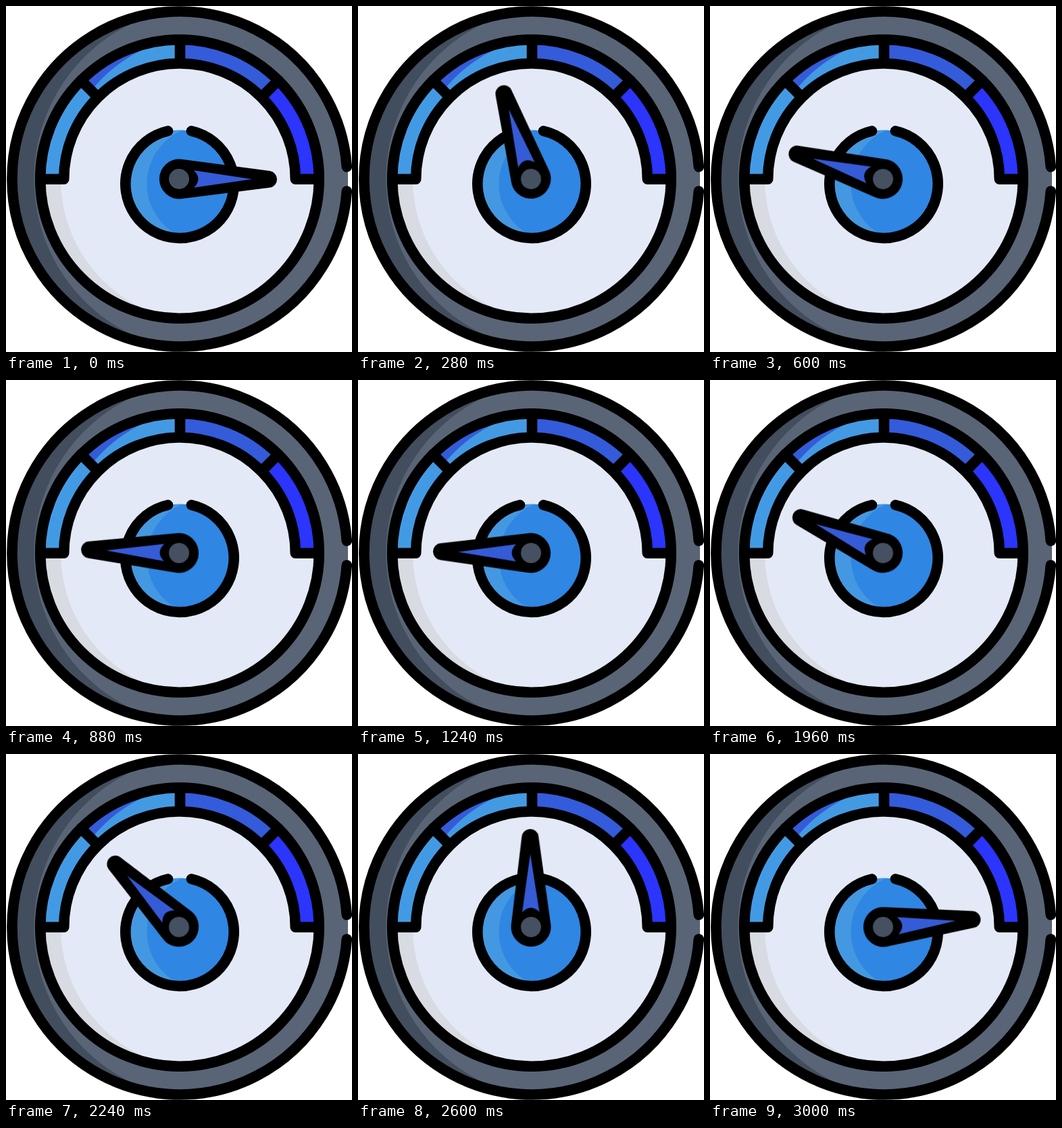
These frames come from a looping animation (512x512 px, 3.04 s). An HTML page:

```html
<!DOCTYPE html>
<html lang="en">
<head>
<meta charset="utf-8">
<title>Gauge</title>
<style>
  html, body { margin: 0; width: 100%; height: 100%; overflow: hidden; background: #fff; }
  svg { display: block; width: 100vw; height: 100vh; }
  .line { fill: none; stroke: #000; stroke-width: 15.6; stroke-linecap: round; stroke-linejoin: round; }
  .band { fill: none; stroke-width: 36; }
  #needle { transform-origin: 256px 256px; }
</style>
</head>
<body>
<svg viewBox="0 0 512 512">
  <defs>
    <clipPath id="rim"><circle cx="256" cy="256" r="250"/></clipPath>
    <clipPath id="face"><circle cx="257" cy="256" r="206"/></clipPath>
    <clipPath id="cap"><circle cx="257" cy="263.5" r="80"/></clipPath>
    <clipPath id="lit"><circle cx="292.5" cy="256" r="211.5"/></clipPath>
  </defs>

  <!-- rim -->
  <g clip-path="url(#rim)">
    <rect width="512" height="512" fill="#424e5d"/>
    <circle cx="297" cy="256" r="255.5" fill="#596576"/>
  </g>
  <path class="line" d="M504.3 274A248 248 0 1 1 504.3 238"/>

  <!-- face -->
  <g clip-path="url(#face)">
    <rect width="512" height="512" fill="#d8dbe1"/>
    <rect width="512" height="512" fill="#e4e9f7" clip-path="url(#lit)"/>
  </g>

  <!-- scale -->
  <g class="band">
    <path d="M68 256A189 189 0 0 1 123.4 122.4" stroke="#439ae4"/>
    <path d="M123.4 122.4A189 189 0 0 1 257 67" stroke="#345bd9"/>
    <path d="M123.4 122.4A189 189 0 0 1 257 67" stroke="#439ae2" clip-path="url(#lit)"/>
    <path d="M257 67A189 189 0 0 1 390.6 122.4" stroke="#345bd9"/>
    <path d="M390.6 122.4A189 189 0 0 1 446 256" stroke="#2b35fb"/>
  </g>
  <g class="line">
    <circle cx="257" cy="256" r="206.3"/>
    <path d="M52 256.3H85.7A171.3 171.3 0 0 1 428.3 256.3H462"/>
    <path d="M257.5 50V84M111 110L136 135M403 110L378 135"/>
  </g>

  <!-- cap -->
  <g clip-path="url(#cap)">
    <rect x="170" y="180" width="180" height="170" fill="#4498e1"/>
    <circle cx="294.5" cy="263" r="86" fill="#2f86e3"/>
  </g>
  <path class="line" d="M239.5 185A80.2 80.2 0 1 0 274.5 185"/>

  <g id="needle">
    <path d="M259.8 226.7L390.1 244A12.5 12.5 0 0 1 390.1 268.8L259.8 285.3A29.5 29.5 0 1 1 259.8 226.7Z"/>
    <path d="M278 243.2Q291 256 278 268.8L364 256.3Z" fill="#355bd6"/>
    <circle cx="256" cy="256" r="15" fill="#455160"/>
  </g>
</svg>
<script>
  const LOOP = 3040, STEP = 40;

  // [ms, degrees short of pointing left]
  const keys = [
    [0, 180], [20, 175], [220, 90], [400, 44.5], [600, 16], [700, 8], [900, 1.6],
    [1080, 0.4], [1240, 0.7], [1640, 7], [1840, 16], [2240, 44.5], [2600, 89.3],
    [3000, 175], [3040, 180]
  ];

  const slope = i => (keys[i + 1][1] - keys[i][1]) / (keys[i + 1][0] - keys[i][0]);

  // Harmonic mean keeps the curve free of overshoot.
  function tangent(i) {
    if (i === 0 || i === keys.length - 1) return 0;
    const a = slope(i - 1), b = slope(i);
    return a * b > 0 ? 2 * a * b / (a + b) : 0;
  }

  function gapAt(t) {
    let i = 0;
    while (t >= keys[i + 1][0]) i++;
    const [t0, a] = keys[i], [t1, b] = keys[i + 1];
    const h = t1 - t0, u = (t - t0) / h, v = 1 - u;
    return a * v * v * (1 + 2 * u) + b * u * u * (3 - 2 * u)
      + h * u * v * (tangent(i) * v - tangent(i + 1) * u);
  }

  const frames = [];
  for (let t = 0; t <= LOOP; t += STEP) {
    const turn = t < LOOP ? gapAt(t) - 180 : 0;
    frames.push({ transform: `rotate(${turn}deg)`, offset: t / LOOP, easing: "steps(1, end)" });
  }
  document.getElementById("needle").animate(frames, { duration: LOOP, iterations: Infinity });
</script>
</body>
</html>
```
